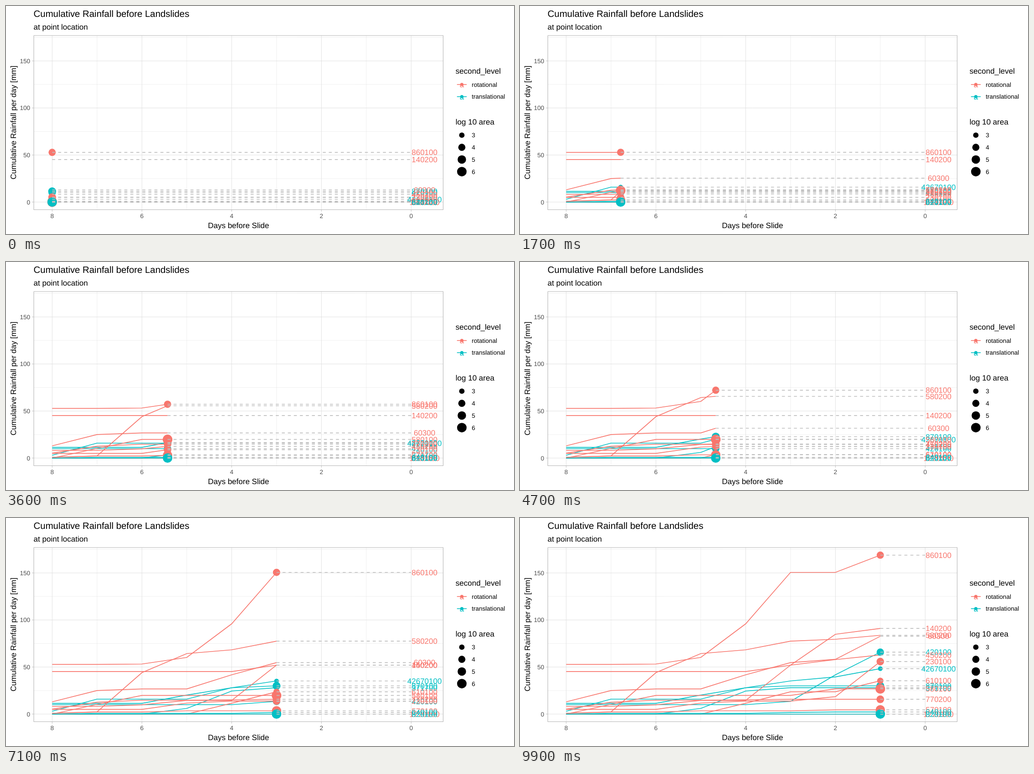
These frames come from a looping animation (1115x502 px, 10000 ms). An HTML page with a canvas:

```html
<!DOCTYPE html>
<html lang="en">
<head>
<meta charset="utf-8">
<title>Cumulative Rainfall before Landslides</title>
<style>
  html, body { margin: 0; width: 100%; height: 100%; overflow: hidden; background: #fff; }
  canvas { display: block; }
</style>
</head>
<body>
<canvas id="chart" width="1115" height="502"></canvas>
<script>
const ctx = document.getElementById('chart').getContext('2d');
const RED = '#F8766D', TEAL = '#00BFC4', GRID = '#DEDEDE', FRAME = '#B3B3B3';
const PANEL = { left: 61, right: 959.5, top: 65, bottom: 448.5 };
const LINE = 1.64, BASE = 17, SMALL = 13.55;
const FIRST_DAY = 8, DAYS = 7, FRAMES = 100;

// Each slide has a starting sum and the rain of its wet days, keyed by days before the slide.
// Slides without a known log 10 area get no dot.
const slide = color => (id, start, rain = {}, area = 0) => ({ id, start, rain, area, color });
const rotational = slide(RED), translational = slide(TEAL);
const slides = [
  translational('42670100', 3, { 7: 12.9, 4: 12.1, 3: 7.2, 2: 4.3, 1: 8.8 }, 2.7),
  translational('420100', 10, { 3: 3.5, 2: 28.2, 1: 24.1 }, 4.2),
  translational('870100', 11.4, { 5: 8.8, 4: 7.8, 3: 2 }, 4.6),
  translational('371700', 0, { 5: 6, 4: 18.5, 3: 3.5 }),
  rotational('1220100', 0),
  rotational('140200', 45.2, { 3: 6.8, 2: 32.8, 1: 6.2 }),
  rotational('60300', 13, { 7: 12, 6: 1.7, 4: 15, 3: 13, 2: 3.5, 1: 24.5 }),
  rotational('450200', 8.2, { 6: 1.6, 5: 4.7, 3: 37.5, 2: 5.9, 1: 4.9 }),
  rotational('580200', 0.8, { 7: 1.5, 6: 41.7, 5: 20.3, 4: 4, 3: 9.2, 2: 2, 1: 4.2 }),
  rotational('770200', 5.2, { 7: 7.4, 6: 2.1, 4: 0.5, 3: 0.5 }, 4.4),
  rotational('230100', 5, { 5: 6.7, 4: 2.1, 2: 4.7, 1: 37.3 }, 4.3),
  rotational('610100', 0, { 4: 11.5, 3: 12.2, 1: 11.7 }, 3.5),
  rotational('570100', 0.8, { 7: 1.4, 5: 1.3, 2: 1 }, 5.8),
  rotational('580100', 0, { 7: 10.2, 6: 9.6, 2: 7 }, 6.1),
  rotational('860100', 52.8, { 6: 0.4, 5: 7, 4: 35.7, 3: 54.7, 1: 18.3 }, 4.1),
  translational('640100', 0, { 7: 0.8, 3: 0.9, 2: 0.5 }),
  translational('820100', 0, {}, 5.9)
];

const xOf = day => 889.3 - 98.5 * day;
const yOf = mm => 431.7 - 2.0717 * mm;
const radiusOf = area => 1.3 + 4.6 * Math.sqrt(area - 2);

function sumAt({ start, rain }, day) {
  let sum = start;
  for (let d = FIRST_DAY; d >= day; d--) sum += rain[d] || 0;
  return sum;
}

function line(points, color, width = LINE, dash = []) {
  ctx.beginPath();
  points.forEach(([x, y]) => ctx.lineTo(x, y));
  ctx.strokeStyle = color;
  ctx.lineWidth = width;
  ctx.setLineDash(dash);
  ctx.stroke();
}

function dot(x, y, radius, color) {
  ctx.beginPath();
  ctx.arc(x, y, radius, 0, 2 * Math.PI);
  ctx.fillStyle = color;
  ctx.fill();
}

function text(str, x, y, size, color = '#000', align = 'left') {
  ctx.font = `${size}px "Liberation Sans", Arial, sans-serif`;
  ctx.textRendering = 'geometricPrecision';
  ctx.textAlign = align;
  ctx.fillStyle = color;
  ctx.fillText(str, x, y);
}

function drawAxes() {
  const { left, right, top, bottom } = PANEL;
  const gridWidth = major => major ? 0.9 : 0.45;
  for (let mm = 0; mm <= 175; mm += 25) {
    const y = yOf(mm), major = mm % 50 === 0;
    line([[left, y], [right, y]], GRID, gridWidth(major));
    if (!major) continue;
    line([[left - 4.2, y], [left, y]], FRAME, 0.82);
    text(mm, 53, y + 4.9, SMALL, '#4D4D4D', 'right');
  }
  for (let day = 0; day <= FIRST_DAY; day++) {
    const x = xOf(day), major = day % 2 === 0;
    line([[x, top], [x, bottom]], GRID, gridWidth(major));
    if (!major) continue;
    line([[x, bottom], [x, bottom + 4.2]], FRAME, 0.82);
    text(day, x, 466.5, SMALL, '#4D4D4D', 'center');
  }
  text('Cumulative Rainfall before Landslides', 60.6, 24, 20.36);
  text('at point location', 60.6, 52, BASE);
  text('Days before Slide', 510.3, 489, BASE, '#000', 'center');
  ctx.save();
  ctx.translate(21.5, 256.5);
  ctx.rotate(-Math.PI / 2);
  text('Cumulative Rainfall per day [mm]', 0, 0, BASE, '#000', 'center');
  ctx.restore();
}

function drawLegend() {
  const left = 986.8, center = 1000.5, labelX = 1022.2, row = 26.75;
  text('second_level', left, 149, BASE);
  [['rotational', RED], ['translational', TEAL]].forEach(([name, color], i) => {
    const y = 172.8 + row * i;
    line([[center - 10.7, y], [center + 10.7, y]], color);
    dot(center, y, 3.5, color);
    text('a', center, y + 6, BASE, color, 'center');
    text(name, labelX, y + 4.9, SMALL);
  });
  text('log 10 area', left, 260.5, BASE);
  for (let area = 3; area <= 6; area++) {
    const y = 284.4 + row * (area - 3);
    dot(center, y, radiusOf(area), '#000');
    text(area, labelX, y + 4.9, SMALL);
  }
}

// Each day begins on a whole frame; the sums move linearly in between.
function daysElapsed(frame) {
  const startOf = day => Math.round(day * (FRAMES - 1) / DAYS);
  let day = 0;
  while (day < DAYS - 1 && startOf(day + 1) <= frame) day++;
  return day + (frame - startOf(day)) / (startOf(day + 1) - startOf(day));
}

function drawSlides(elapsed) {
  const day = FIRST_DAY - Math.floor(elapsed), part = elapsed % 1;
  const x = xOf(FIRST_DAY - elapsed);
  const heads = slides.map(s => {
    const from = sumAt(s, day);
    return { ...s, y: yOf(from + part * (sumAt(s, day - 1) - from)) };
  });
  for (const s of heads) {
    const path = [];
    for (let d = FIRST_DAY; d >= day; d--) path.push([xOf(d), yOf(sumAt(s, d))]);
    line([...path, [x, s.y]], s.color);
  }
  heads.forEach(s => s.area && dot(x, s.y, radiusOf(s.area), s.color));
  heads.forEach(s => line([[x, s.y], [xOf(0), s.y]], '#BEBEBE', LINE, [6.6, 6.6]));
  heads.forEach(s => text(s.id, 918.6, s.y + 6.1, BASE, s.color, 'center'));
}

function draw(now) {
  const frame = Math.floor(now / 100) % FRAMES;
  const { left, right, top, bottom } = PANEL;
  ctx.fillStyle = '#fff';
  ctx.fillRect(0, 0, 1115, 502);
  drawAxes();
  drawSlides(daysElapsed(frame));
  line([[left, top], [right, top], [right, bottom], [left, bottom], [left, top]], FRAME, 1.1);
  drawLegend();
}

const start = performance.now();
function tick() {
  draw(performance.now() - start);
  requestAnimationFrame(tick);
}
tick();
</script>
</body>
</html>
```
